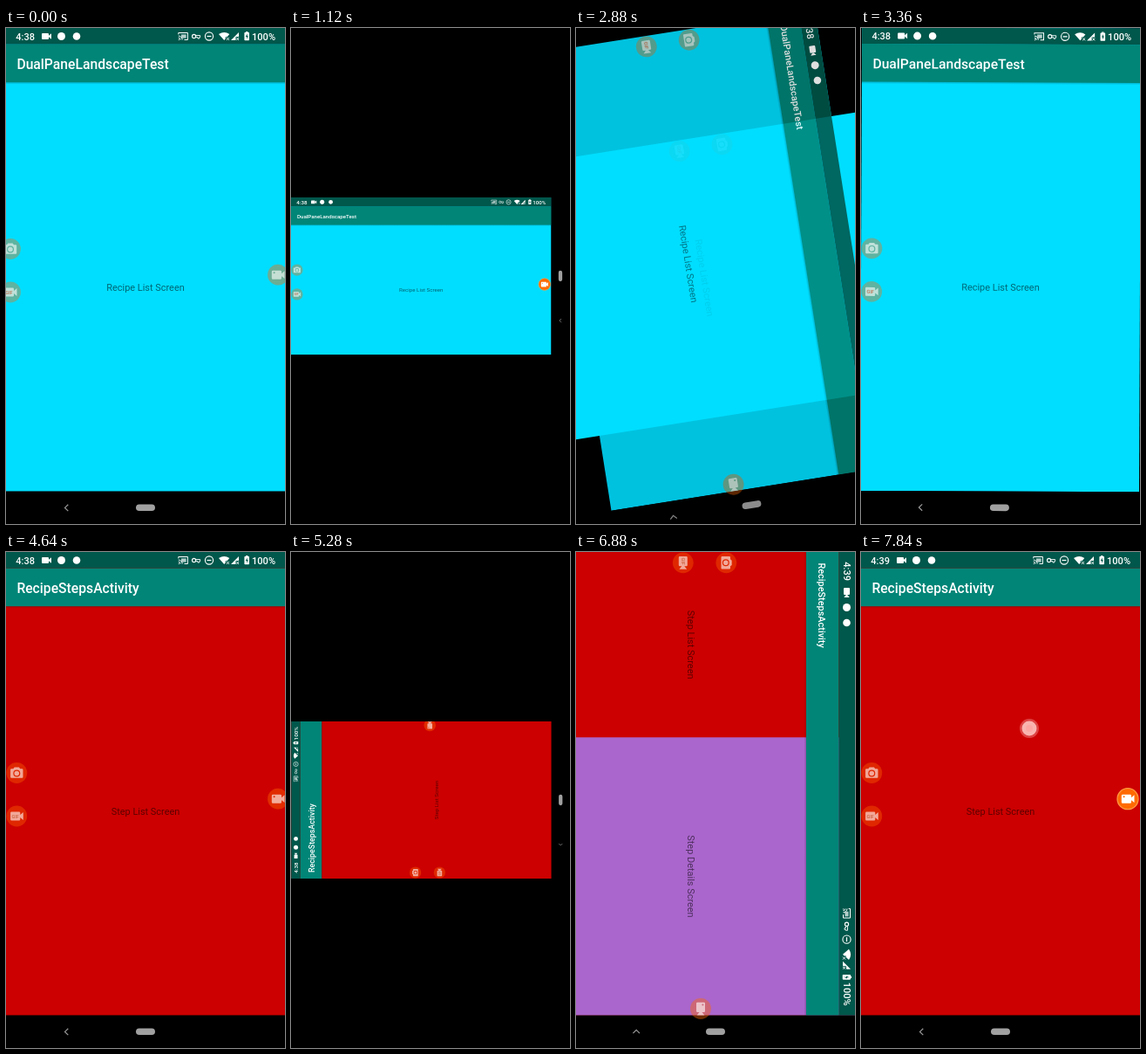
Recreate the animation shown at these times as an HTML page with a canvas. Size 320 by 568 pixels, loop 8000 ms.

```html
<!DOCTYPE html>
<html lang="en">
<head>
<meta charset="utf-8">
<title>Dual pane rotation</title>
<style>
  html, body { margin: 0; width: 100%; height: 100%; overflow: hidden; background: #000; }
  canvas { display: block; width: 320px; height: 568px; }
</style>
</head>
<body>
<canvas id="stage"></canvas>
<script>
const W = 320, H = 568, LOOP = 8000, STEP = 160;
const BOX_Y = 194, BOX_H = 180, SMALL = BOX_H / W;
const QUARTER = Math.PI / 2;
const DP = 7 / 9;
const STATUS = 24 * DP, TALL_BAR = 80 * DP, WIDE_BAR = 72 * DP, NAV = H - 48 * DP;
const FONT = 'Roboto, "Open Sans", sans-serif';
const COLOR = {
  status: '#00574b', bar: '#008577', cyan: '#00deff', red: '#cc0000',
  purple: '#aa66cc', orange: '#ff6a00', text: 'rgba(0,0,0,.54)'
};
const dpr = window.devicePixelRatio || 1;
const stage = document.getElementById('stage');
const layer = document.createElement('canvas');
for (const c of [stage, layer]) { c.width = W * dpr; c.height = H * dpr; }
const main = stage.getContext('2d'), side = layer.getContext('2d');
let g = main;

const clamp = v => Math.max(0, Math.min(1, v));
const easeOut = u => 1 - (1 - clamp(u)) ** 3;

function rect(x, y, w, h, fill) {
  g.fillStyle = fill;
  g.fillRect(x, y, w, h);
}
function round(x, y, w, h, r, fill) {
  g.fillStyle = fill;
  g.beginPath();
  g.roundRect(x, y, w, h, r);
  g.fill();
}
function disc(x, y, r, fill) {
  g.fillStyle = fill;
  g.beginPath();
  g.arc(x, y, r, 0, 7);
  g.fill();
}
function ring(x, y, r, color, width) {
  g.strokeStyle = color;
  g.lineWidth = width;
  g.beginPath();
  g.arc(x, y, r, 0, 7);
  g.stroke();
}
function path(d, color, width) {
  const p = new Path2D(d);
  if (width) { g.strokeStyle = color; g.lineWidth = width; g.stroke(p); }
  else { g.fillStyle = color; g.fill(p, 'evenodd'); }
}
function label(s, x, y, size, fill, align = 'left', weight = 400) {
  g.font = `${weight} ${size}px ${FONT}`;
  g.textAlign = align;
  g.textBaseline = 'alphabetic';
  g.fillStyle = fill;
  g.fillText(s, x, y);
}
function at(x, y, angle, scale, draw) {
  g.save();
  g.translate(x, y);
  g.rotate(angle);
  g.scale(scale, scale);
  draw();
  g.restore();
}

function statusBar(width, clock) {
  const c = '#fff';
  rect(0, 0, width, STATUS, COLOR.status);
  label(clock, 11.3, 13.5, 11, c, 'left', 500);
  round(41, 6, 8, 7, 1, c);
  path('M49 8.8L52 6.3V12.7L49 10.2Z', c);
  disc(63.5, 9.5, 4.5, c);
  disc(81, 9.5, 4.3, c);

  g.save();
  g.translate(width - W, 0);
  path('M197.8 7.4V5.5H208.4V13.5H204.5M197.8 13.5h1M197.8 11.3a2.2 2.2 0 0 1 2.2 2.2M197.8 9.1a4.4 4.4 0 0 1 4.4 4.4', c, 1);
  rect(201, 7.4, 5.6, 4.2, 'rgba(255,255,255,.7)');
  ring(215.6, 9.5, 2.1, c, 1.1);
  path('M217.6 8.5H222.6V10.6H221.8V12H219.9V10.6H217.6', c, .9);
  ring(233, 9.5, 4.6, c, 1.1);
  path('M230.5 9.5H235.5', c, 1.2);
  path('M244 7Q250.3 2.8 256.3 7L253.6 10.2H251.8V12.3L250.2 14Z', c);
  path('M253 11l3 3m0-3l-3 3', c, .9);
  path('M258 14L267 5V10H263.5V14Z', c);
  path('M264.4 11l2.6 3m0-3l-2.6 3', c, .9);
  round(273.4, 5, 5.6, 9.3, .8, c);
  rect(275, 4, 2.4, 1.2, c);
  path('M276.7 6.5L274.8 10H276V12.8L277.8 9H276.7Z', COLOR.status);
  label('100%', 282, 13.5, 11.1, c, 'left', 500);
  g.restore();
}

function appBar(width, bottom, title, size) {
  rect(0, STATUS, width, bottom - STATUS, COLOR.bar);
  label(title, 12.4, (STATUS + bottom) / 2 + size * .41, size, '#fff', 'left', 500);
  const shade = g.createLinearGradient(0, bottom, 0, bottom + 2.5);
  shade.addColorStop(0, 'rgba(0,0,0,.2)');
  shade.addColorStop(1, 'rgba(0,0,0,0)');
  rect(0, bottom, width, 2.5, shade);
}

function bubble(kind, x, y, strength) {
  const fresh = clamp((strength - .4) / .6);
  const white = `rgba(255,255,255,${.6 + .4 * fresh})`;
  g.save();
  g.translate(x, y);
  g.globalAlpha = strength;
  disc(0, 0, 11.9, COLOR.orange);
  g.globalAlpha = fresh;
  ring(0, 0, 12, '#ff9b42', 1.3);
  g.globalAlpha = 1;
  if (kind === 'photo') {
    const hole = r => `M${-r} .5a${r} ${r} 0 1 0 ${2 * r} 0a${r} ${r} 0 1 0 ${-2 * r} 0Z`;
    path('M-6.2 -4.7H-4L-2.6 -6.4H2.6L4 -4.7H6.2Q7.2 -4.7 7.2 -3.7V4.8Q7.2 5.8 6.2 5.8H-6.2Q-7.2 5.8 -7.2 4.8V-3.7Q-7.2 -4.7 -6.2 -4.7Z' + hole(4) + hole(2.8), white);
  } else {
    path('M-6 -5H2.8Q4 -5 4 -3.8V-1.5L7.5 -4.4V4.4L4 1.5V3.8Q4 5 2.8 5H-6Q-7.2 5 -7.2 3.8V-3.8Q-7.2 -5 -6 -5Z'
      + (kind === 'video' ? 'M-5.4 -2.4a1 1 0 1 0 2 0a1 1 0 1 0 -2 0Z' : ''), white);
    if (kind === 'gif') label('GIF', -1.6, 2, 5.5, 'rgba(190,80,40,.65)', 'center', 700);
  }
  g.restore();
}

// age: ms since the right bubble came back; negative keeps it hidden
function rightBubble(x, y, age) {
  if (age < 0) return;
  const d = clamp((age - 300) / 480);
  bubble('video', x + 6 * d, y, 1 - .58 * d);
}
function leftBubbles(x, y) {
  bubble('photo', x, y, .37);
  bubble('gif', x, y + 49.5, .37);
}

function portraitApp(steps, clock) {
  rect(0, 0, W, NAV, steps ? COLOR.red : COLOR.cyan);
  appBar(W, TALL_BAR, steps ? 'RecipeStepsActivity' : 'DualPaneLandscapeTest', 15.7);
  statusBar(W, clock);
  label(steps ? 'Step List Screen' : 'Recipe List Screen', 160, 300.7, 10.95, COLOR.text, 'center');
}

function portrait(s) {
  portraitApp(s.steps, s.clock);
  if (s.reveal) {
    const top = NAV * (1 - s.reveal);
    g.save();
    g.beginPath();
    g.rect(0, top, W, NAV - top);
    g.clip();
    g.translate(0, 22 * (1 - s.reveal));
    portraitApp(true, s.clock);
    g.restore();
  }
  rect(0, NAV, W, H - NAV, '#000');
  path('M71.3 545.7L67.5 549.4L71.3 553.1', '#9a9a9a', 1.2);
  round(149, 545.5, 22, 7.6, 3.8, '#a0a0a0');
  leftBubbles(s.left ?? 12.3, 253);
  rightBubble(306, 282.7, s.age);
  if (s.touch) {
    disc(193, 202, 11, 'rgba(255,190,190,.35)');
    disc(193, 202, 8.5, 'rgba(255,205,200,.82)');
    disc(193, 202, 4, 'rgba(255,150,150,.45)');
  }
}

function landscape(s) {
  const split = NAV * .4;
  rect(0, 0, NAV, W, s.steps ? COLOR.red : COLOR.cyan);
  if (s.steps) rect(split, 0, NAV - split, W, COLOR.purple);
  appBar(NAV, WIDE_BAR, s.steps ? 'RecipeStepsActivity' : 'DualPaneLandscapeTest', 10.9);
  statusBar(NAV, s.clock);
  const pane = (text, x) => label(text, x, 192.4, 10.95, COLOR.text, 'center');
  if (s.steps) {
    pane('Step List Screen', split / 2);
    pane('Step Details Screen', (split + NAV) / 2);
  } else {
    pane('Recipe List Screen', NAV / 2);
  }
  rect(NAV, 0, H - NAV, W, '#000');
  path('M551.2 247L547.4 250.8L551.2 254.6', '#9a9a9a', 1.2);
  round(545.5, 149, 7.6, 22, 3.8, '#a0a0a0');
  leftBubbles(12.3, 147.7);
  rightBubble(517, 177, s.age);
}

const tall = s => () => { g.translate(-W / 2, -H / 2); portrait(s); };
const wide = s => () => { g.translate(-H / 2, -W / 2); landscape(s); };

// Both screens turn together about the centre while the old one fades.
function turn(p, from, scale, next, old) {
  const angle = from * (1 - p), fade = clamp(1 - p * 1.25);
  at(160, 284, angle, scale, next);
  if (!fade) return;
  side.setTransform(dpr, 0, 0, dpr, 0, 0);
  side.clearRect(0, 0, W, H);
  g = side;
  at(160, 284, angle, scale, old);
  g = main;
  g.save();
  g.globalAlpha = fade;
  g.drawImage(layer, 0, 0, W, H);
  g.restore();
}

function letterbox(draw) {
  g.save();
  g.beginPath();
  g.rect(0, BOX_Y, W, BOX_H);
  g.clip();
  draw();
  g.restore();
}

// One round: upright, over to wide (from a), back to upright (from b).
function scene(t, s, a, b) {
  const docked = { ...s, age: 2000 };
  if (t < a) {
    portrait(s);
  } else if (t < a + 160) {
    at(0, W, -QUARTER, 1, () => portrait(docked));
  } else if (t < a + 960) {
    const p = easeOut((t - a - 460) / 500);
    letterbox(() => turn(p, -QUARTER, SMALL, wide({ ...s, age: -1 }), tall(docked)));
  } else if (t < b) {
    letterbox(() => at(0, BOX_Y, 0, SMALL, () => landscape({ ...s, age: t - a - 960 })));
  } else if (t < b + 160) {
    letterbox(() => at(BOX_H, BOX_Y, QUARTER, SMALL, () => landscape(docked)));
    at(0, BOX_Y, 0, SMALL, () => bubble('video', 523, 177, .32));
  } else if (t < b + 640) {
    at(160, 284, QUARTER, 1, wide(docked));
  } else {
    const p = easeOut((t - b - 620) / 580);
    if (p < 1) turn(p, QUARTER, 1, tall(s), wide(docked));
    else portrait(s);
  }
}

function draw(t) {
  g.setTransform(dpr, 0, 0, dpr, 0, 0);
  rect(0, 0, W, H, '#000');
  const s = { steps: t >= 4160, clock: t < 6240 ? '4:38' : '4:39' };
  if (t < 3840) {
    s.age = t < 160 ? 2000 : t - 3520;
    if (t < 160) s.left = 5;
    s.touch = t >= 3520;
    scene(t, s, 160, 2240);
  } else {
    s.age = t < 7200 ? t - 3520 : t - 7840;
    s.reveal = t < 4160 ? easeOut((t - 3720) / 400) : 0;
    s.touch = t >= 7840;
    scene(t, s, 4960, 6620);
  }
}

function tick() {
  const t = performance.now() % LOOP;
  draw(Math.floor(t / STEP) * STEP);
  requestAnimationFrame(tick);
}
tick();
</script>
</body>
</html>
```
